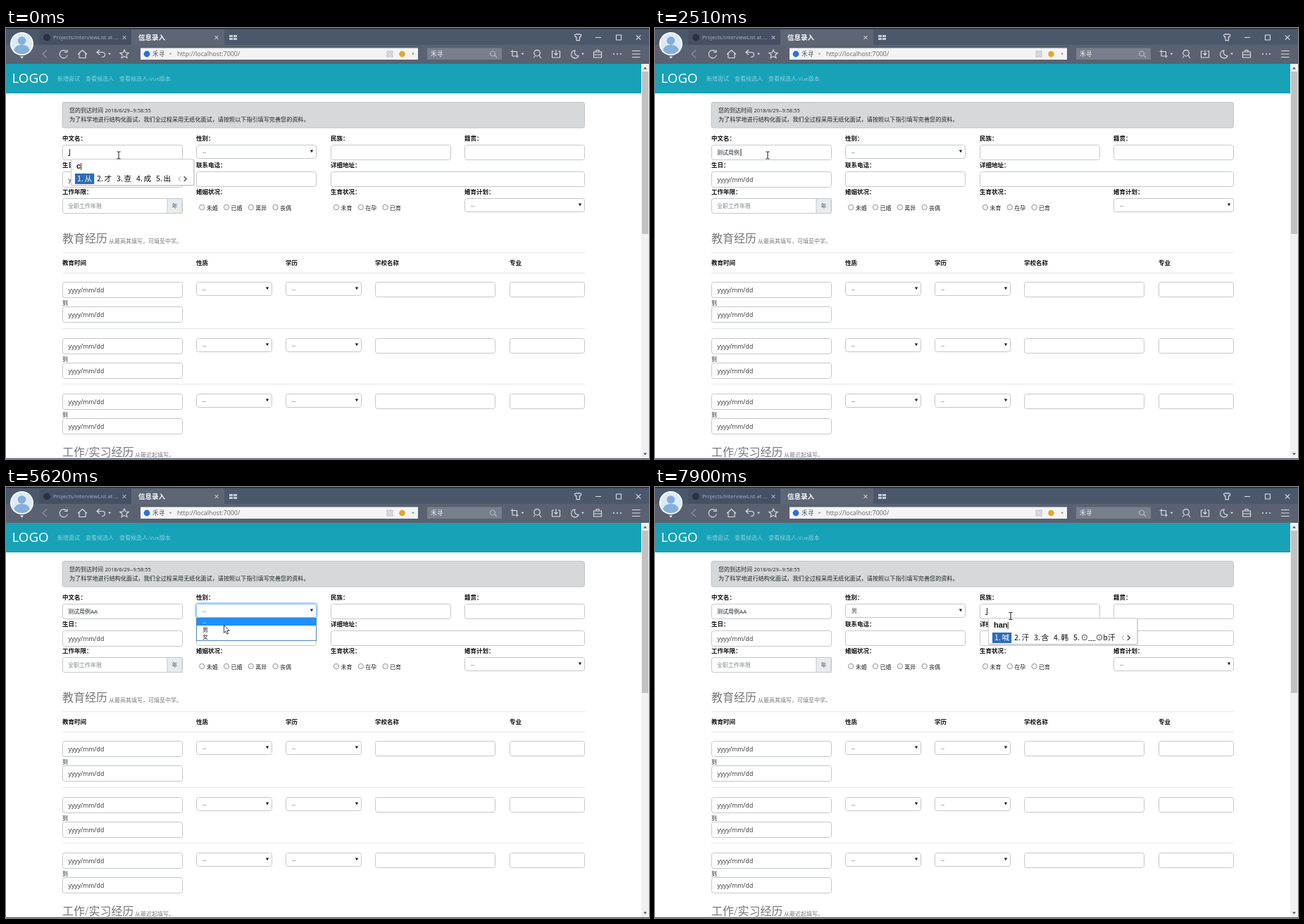
These frames come from a looping animation (913 by 613 pixels, 8000 ms). An HTML page:

```html
<!DOCTYPE html>
<html lang="zh-CN">
<head>
<meta charset="utf-8">
<title>信息录入</title>
<style>
html,body{margin:0;width:100%;height:100%;overflow:hidden;background:#fff}
svg{display:block;width:913px;height:613px}
text{font-family:"Open Sans","Noto Sans CJK SC","Noto Sans CJK",sans-serif;white-space:pre}
.im{font-family:"Liberation Sans",Arial,sans-serif;font-weight:700}
.cj{font-family:"Noto Sans CJK SC","Noto Sans CJK",sans-serif}
</style>
</head>
<body>
<svg id="stage" viewBox="0 0 913 613"><g id="page"></g><g id="live"></g></svg>
<script>
const LOOP = 8000;
const INK = '#212529', LINE = '#c3c7cb', ICON = '#dde1e7';

// x is the left edge, y the vertical middle
const text = (x, y, s, size = 8, fill = INK, more = '') =>
  `<text x="${x}" y="${y + size * .37}" font-size="${size}" fill="${fill}" ${more}>${s}</text>`;
const rect = (x, y, w, h, fill, more = '') =>
  `<rect x="${x}" y="${y}" width="${w}" height="${h}" fill="${fill}" ${more}/>`;
const path = (d, stroke = ICON, w = 1.1, fill = 'none') =>
  `<path d="${d}" fill="${fill}" stroke="${stroke}" stroke-width="${w}"/>`;
const dot = (x, y, r, fill, more = '') =>
  `<circle cx="${x}" cy="${y}" r="${r}" fill="${fill}" ${more}/>`;
const tri = (x, y, w, h, fill) =>
  `<path d="M${x - w / 2} ${y - h / 2}h${w}L${x} ${y + h / 2}Z" fill="${fill}"/>`;
const bold = (x, y, s) => text(x, y, s, 8.5, '#111', 'font-weight="700"');
const box = (x, y, w, h, stroke = LINE) =>
  rect(x + .5, y + .5, w - 1, h - 1, '#fff', `rx="3" stroke="${stroke}"`);
const select = (x, y, w, value = '--', stroke = LINE) =>
  box(x, y, w, 20, stroke) + text(x + 9, y + 10.5, value, 8, '#444') + tri(x + w - 7, y + 9.5, 4.4, 4.2, '#222');
const date = (x, y) => box(x, y, 171, 23) + text(x + 8.5, y + 11.5, 'yyyy/mm/dd', 8.7, '#333');
const rule = y => rect(80, y, 742, 1, '#e4e7ea');
const radios = (x, names) => names.map((n, i) =>
  dot(x + i * 34.8, 255, 3.7, '#f4f4f4', 'stroke="#8d8d8d" stroke-width=".9"') +
  text(x + 6.5 + i * 34.8, 256.5, n, 8)).join('');
const cross = (x, y, r, c) => path(`M${x - r} ${y - r}l${2 * r} ${2 * r}m0 ${-2 * r}l${-2 * r} ${2 * r}`, c);

function browser() {
  let s = rect(0, 0, 913, 25, '#4b586c') + rect(0, 24, 913, 27, '#5a6271') + rect(0, 0, 913, 1.3, '#20262f');
  // tabs
  s += rect(47, 3, 131, 21, '#465064') + rect(178, 2, 132, 23, '#5d6675');
  s += dot(58, 13.5, 5, '#2a3140');
  s += text(67, 13.5, 'Projects/interviewList at ...', 7.6, '#a9b1bf') + cross(168, 13.5, 2.4, '#aab2be');
  s += text(188, 13.5, '信息录入', 9.5, '#fff', 'font-weight="700"') + cross(299, 13.5, 2.4, '#c5cad2');
  for (const [x, y] of [[317, 10], [323, 10], [317, 14], [323, 14]]) s += rect(x, y, 5, 3, '#c7ccd5');
  // window buttons
  s += path('M807.5 10l3-1.5q1.700 1.800 3.400 0l3 1.500-1 2.600h-1.500v5h-4.400v-5h-1.500Z');
  s += path('M837 13.500h8M866.500 10h7v7h-7Z') + cross(898, 13.5, 3.2, ICON);
  // avatar
  s += dot(22.5, 22.5, 16.5, '#fff') + dot(22.5, 22.5, 14.8, '#dceaf7');
  s += dot(22.5, 18, 5.8, '#84aedb') + '<path d="M11.500 32q1-8 11-8t11 8q-4.500 5.200-11 5.200t-11-5.200Z" fill="#84aedb"/>';
  s += tri(22.5, 42, 5, 3, '#fff');
  // navigation
  s += path('M58 31.500l-6 5.500 6 5.500', '#8c95a3') + path('M86 33.500a5.600 5.600 0 1 0 1.300 5M87 31v3.500h-4');
  s += path('M102 37.500l6.500-6 6.500 6M104 36v6.500h9v-6.500');
  s += path('M133 31l-4 3.500 4 3.500M129 34.500h7q4.500 0 4.500 3.500t-4.500 3.500') + tri(147, 37, 4, 2.5, ICON);
  s += path('M168 31l1.800 4 4.400.4-3.300 2.900 1 4.300-3.900-2.300-3.900 2.300 1-4.300-3.300-2.900 4.400-.4Z');
  s += rect(191, 28.5, 394, 16.5, '#f3f4f6') + dot(200, 37, 4.4, '#2e6fdc');
  s += text(208, 36.5, '禾寻', 8.7, '#555') + tri(233.5, 37, 4, 2.3, '#999');
  s += text(243, 36.5, 'http://localhost:7000/', 8.9, '#666');
  for (const [x, y] of [[541, 33], [546, 33], [541, 38], [546, 38]])
    s += rect(x, y, 3, 3, 'none', 'stroke="#a2a7ae" stroke-width=".8"');
  s += dot(562.5, 37, 4.3, '#e2a928') + tri(578, 37, 4, 2.3, '#888');
  s += rect(598, 28.5, 106, 16.5, '#78808d') + text(603, 36.5, '禾寻', 8.7, '#f0f2f4');
  s += path('M691 40a3.500 3.500 0 1 1 .1 0M694 39l3 3', '#b5bbc4');
  // tools
  s += path('M719 31v9h9M716.500 33.500h9v9') + tri(733.5, 37, 4, 2.5, ICON);
  s += path('M754 40a4.300 4.300 0 1 1 .1 0M757 39l3 4M751 40l-2 2.500');
  s += path('M778 33h-2.500v9h11v-9h-2.500M781 31v7.500m-2.500-2.500l2.500 2.500 2.500-2.500');
  s += path('M808 32a5.400 5.400 0 1 0 5 7.500a5 5 0 0 1-5-7.500Z') + tri(819, 37, 4, 2.5, ICON);
  s += path('M834.500 34h11v8h-11ZM838 34v-2.500h4v2.500M834.500 38h11');
  for (const x of [863, 868, 873]) s += dot(x, 37, 1, ICON);
  return s + path('M889 32.500h11.500M889 37h11.500M889 41.500h11.500');
}

function form() {
  let s = rect(0, 51, 902, 42, '#17a2b8');
  s += text(8.5, 71.5, 'LOGO', 18.7, '#fff');
  [[73, '新增面试'], [113, '查看候选人'], [161, '查看候选人-Vue版本']]
    .forEach(([x, n]) => s += text(x, 72, n, 8, '#8bd1dc'));
  s += rect(902, 51, 11, 562, '#f1f1f1') + rect(903, 62, 9, 231, '#c1c1c1');
  s += tri(907.5, 57, 5, -3, '#505050') + tri(907.5, 606, 5, 3, '#505050');
  s += rect(80, 105.5, 741.5, 36.5, '#d6d8d9', 'rx="3" stroke="#c2c5c8"');
  s += text(90, 117.5, '您的到达时间', 8) + text(140.5, 117.5, '2018/6/29--9:58:55', 7.45);
  s += text(90, 130, '为了科学地进行结构化面试，我们全过程采用无纸化面试，请按照以下指引填写完善您的资料。', 8.12);

  const cols = [80, 270, 461, 651];
  [['中文名', '性别', '民族', '籍贯'], ['生日', '联系电话', '详细地址'], ['工作年限', '婚姻状况', '生育状况', '婚育计划']]
    .forEach((row, r) => row.forEach((n, c) => s += bold(cols[c], 156.5 + r * 38.1, n + '：')));
  s += box(80, 166, 171, 22) + box(461, 166, 171, 22) + box(651, 166, 171, 22);
  s += date(80, 204) + box(270, 204, 171, 22) + box(461, 204, 361, 22);
  s += box(80, 242, 171, 22) + rect(229, 242.5, 21, 21, '#e9ecef', `stroke="${LINE}"`);
  s += text(88, 253.5, '全职工作年限', 8, '#7d848a') + text(235.5, 253, '年', 8, '#495057');
  s += radios(278.2, ['未婚', '已婚', '离异', '丧偶']) + radios(469, ['未育', '在孕', '已育']);
  s += select(651, 242, 171);

  const head = (y, big, x, small) =>
    text(80, y, big, 16, '#777', 'font-weight="300"') + text(x, y + 4, small, 8, '#777');
  s += head(299, '教育经历', 146, '从最高其填写，可填至中学。');
  s += rule(319) + rule(348);
  [[80, '教育时间'], [270, '性质'], [397, '学历'], [524, '学校名称'], [715, '专业']]
    .forEach(([x, n]) => s += bold(x, 334, n));
  for (let i = 0; i < 3; i++) {
    const y = Math.round(361 + i * 79.5);
    if (i) s += rule(y - 14);
    s += date(80, y) + text(80, y + 30, '到', 8) + date(80, y + 35);
    s += select(270, y, 108) + select(397, y, 108) + box(524, y, 171, 22) + box(715, y, 107, 22);
  }
  s += head(603, '工作/实习经历', 183, '从最近起填写。');
  return s + rect(0, 612, 913, 1, '#3f4d66');
}

// input method window: start, left edge, spelling, words
const popups = [
  [0, 92, 'c', '从 才 查 成 出'],
  [120, 92, 'ce', '测 策 侧 册 厕'],
  [250, 92, "ce's", '测试 测算 厕所 测速 策'],
  [390, 92, "ce'sh", '测试 测试版 测试仪 测 侧室'],
  [760, 92, "ce'shi", '测试 测试题 测试版 测试用例 测试员'],
  [1030, 92, "ce'shi'y", '测试用 测试 测试用例 测试员 测试仪'],
  [1150, 92, "ce'shi'yong", '测试用 测试 测试用例 测试员 测试仪'],
  [1400, 92, "ce'shi'yong'li", '测试用例 测试用 测试 策士 侧石'],
  [1670],
  [2660, 123, 'AA', 'AA 啊啊 嗷嗷 AA制 阿'],
  [3090],
  [7900, 473, 'han', '喊 汗 含 韩 ⊙﹏⊙b汗']
];
const pointer = [
  [0, 'beam', 160, 181], [4130, 'beam', 150, 330], [4250, 'arrow', 230, 583], [4370, 'arrow', 170.5, 559],
  [4520, 'arrow', 300, 360], [4640, 'arrow', 332, 184], [4790, 'arrow', 306, 173], [5350, 'arrow', 306, 179],
  [5470, 'arrow', 306, 185], [5620, 'arrow', 309, 196], [5770, 'arrow', 311, 200], [5890, 'arrow', 312, 202.5],
  [6320, 'arrow', 400, 190], [6440, 'arrow', 481, 178], [6590, 'beam', 490, 180], [6710, 'beam', 502, 182],
  [6830, 'beam', 505, 183.5]
];
const carets = [[0, 90], [510, 0], [760, 90], [1400, 0], [1670, 120], [2230, 0], [2510, 121.5], [3090, 131.5],
  [3610, 0], [6950, 469], [7220, 0], [7750, 469], [7900, 471]];
const names = [[0, ''], [1670, '测试用例'], [3090, '测试用例AA']];
const glows = [[0, 0], [3610, .5], [3730, 1], [6950, .5], [7080, 0]];
const menus = [[0, -1], [5040, 0], [5770, 1], [6170, -1]];
const at = (list, t) => list.filter(k => k[0] <= t).pop();

function popup([, x, spell, words]) {
  if (!spell) return '';
  const em = 10.6;
  const wide = w => em * [...w].reduce((n, c) => n + (c < '~' ? .5 : 1), 1);
  let px = x + 9, s = '';
  words.split(' ').forEach((w, i) => {
    const fill = i ? '#111' : '#fff', len = wide(w);
    if (!i) s += rect(x + 6, 207, len + 6, 15, '#2d6cb8');
    s += text(px, 214.5, i + 1 + '.', em, fill, 'class="cj"') + text(px + em, 214.5, w, em, fill, 'class="cj"');
    px += len + 6.8;
  });
  const end = px - 6.8;
  s += path(`M${end + 14} 211l-3 3.500 3 3.500`, '#b5b5b5') + path(`M${end + 18.5} 211l3.500 3.500-3.500 3.500`, '#444', 1.3);
  s += `<text class="im" x="${x + 8}" y="200" font-size="11" fill="#111">${spell}<tspan font-weight="400" dx="-.8">|</tspan></text>`;
  const w = end + 33 - x;
  return rect(x, 187, w + 1, 38, '#000', 'opacity=".12" rx="2"') +
    rect(x + .5, 186.5, w - 1, 37, '#fff', 'rx="2" stroke="#c9c9c9"') + s;
}

function menu(on) {
  if (on < 0) return '';
  return rect(270.5, 186.5, 170, 32, '#fff', 'stroke="#4f83bd"') +
    rect(271, 186.5 + on * 10.7, 169, 10.7, '#1e90ff') +
    ['--', '男', '女'].map((n, i) => text(279, 192 + i * 10.7, n, 8, i === on ? '#fff' : INK)).join('');
}

function mouse([, kind, x, y]) {
  const shape = kind === 'beam'
    ? path('M-2.500-5h2l.5.5.5-.5h2M0-4.500v9M-2.500 5h2l.5-.5.5.5h2', '#111', 1)
    : path('M.5.5v11l2.500-2.300 1.800 4 1.800-.8-1.800-3.900h3.400Z', '#111', .8, '#fff');
  return `<g transform="translate(${x} ${y})">${shape}</g>`;
}

function scene(t) {
  const glow = at(glows, t)[1], caret = at(carets, t)[1];
  let s = text(88, 177, at(names, t)[1], 8, INK);
  if (glow) s += rect(269, 165, 173, 22, 'none', `rx="4" stroke="#80bdff" stroke-width="2" opacity="${glow * .6}"`);
  s += select(270, 166, 171, t < 6170 ? '--' : '男', glow ? '#80bdff' : LINE);
  if (t < 1670) s += rect(88, 181, 2, 1, '#333');
  if (t >= 7900) s += rect(469, 181, 2, 1, '#333');
  if (caret) s += rect(caret, 172, 1, 10, '#222');
  return s + menu(at(menus, t)[1]) + popup(at(popups, t)) + mouse(at(pointer, t));
}

const live = document.getElementById('live');
document.getElementById('page').innerHTML = form() + browser();
let shown = '';
function draw(now) {
  const next = scene(now % LOOP);
  if (next !== shown) live.innerHTML = shown = next;
  requestAnimationFrame(draw);
}
draw(0);
</script>
</body>
</html>
```
